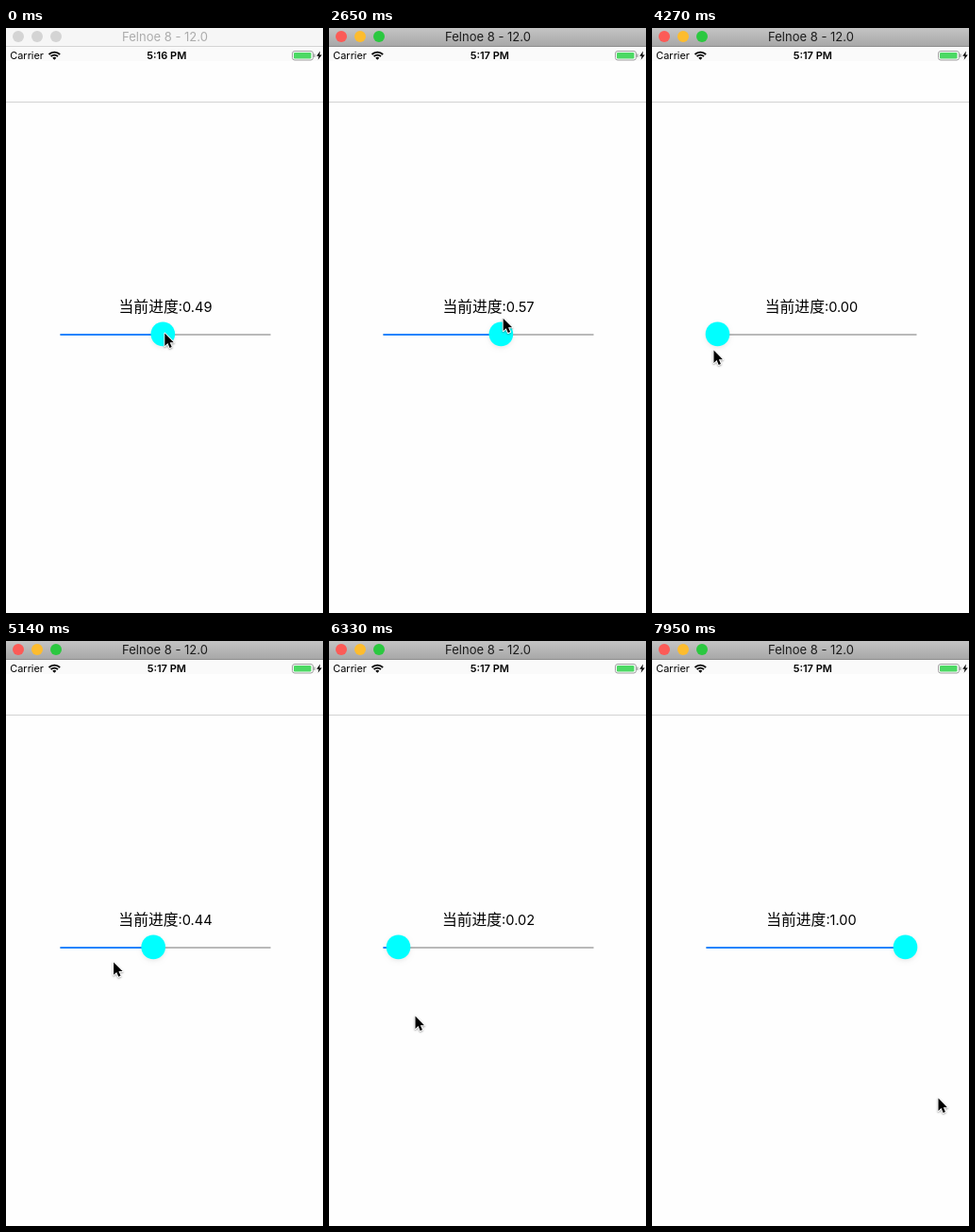
Recreate the animation shown at these times as an HTML page with a canvas. Size 336 px wide and 620 px high, loop 8000 ms.

```html
<!DOCTYPE html>
<html lang="zh">
<head>
<meta charset="utf-8">
<title>Slider</title>
<style>
html, body { margin: 0; width: 100%; height: 100%; overflow: hidden; background: #fefefe; }
canvas { display: block; width: 336px; height: 620px; }
</style>
</head>
<body>
<canvas id="stage"></canvas>
<script>
const W = 336, H = 620, LOOP = 8000;
const canvas = document.getElementById('stage');
const ratio = window.devicePixelRatio || 1;
canvas.width = W * ratio;
canvas.height = H * ratio;
const ctx = canvas.getContext('2d');

const SANS = 'Inter, "Liberation Sans", sans-serif';
const CJK = '"Noto Sans CJK SC", "Noto Sans CJK", "Noto Sans CJK JP", sans-serif';
const TRACK = { left: 57.5, right: 280.5, y: 325, min: 69.5, span: 199 };

// The screen refreshes in steps; the thumb runs slightly ahead of the pointer.
const FRAME = 147.1, FIRST = 300, LEAD = 80, GRIP = 71;

// Turning points of the pointer: time, x, y.
const TURNS = [
  [240, 167.8, 323], [580, 50, 322], [730, 50, 322], [1325, 102.4, 491], [1760, 65, 322],
  [1950, 65, 322], [2690, 185, 307], [3530, 40, 335], [3920, 62, 482], [4270, 65, 341],
  [4560, 65, 331], [4990, 66, 338], [5514, 270, 346], [6030, 75, 322], [6150, 75, 322],
  [6330, 91, 397], [6920, 66, 308], [7300, 66, 308], [7780, 302, 600], [7950, 303, 484]
];
const DRAGS = [[0, 580], [2050, 3530], [4850, 6030], [7370, LOOP]];

const clamp = v => Math.max(0, Math.min(1, v));
const smooth = p => p * p * (3 - 2 * p);

function pointerAt(t) {
  const next = Math.max(1, TURNS.findIndex(turn => turn[0] >= t));
  const i = t > TURNS.at(-1)[0] ? TURNS.length - 1 : next;
  const [t0, x0, y0] = TURNS[i - 1], [t1, x1, y1] = TURNS[i];
  const k = smooth(clamp((t - t0) / (t1 - t0)));
  return { x: x0 + (x1 - x0) * k, y: y0 + (y1 - y0) * k };
}

function valueAt(t) {
  const end = DRAGS.findLast(drag => drag[0] <= t)[1];
  return clamp((pointerAt(Math.min(t, end) + LEAD).x - GRIP) / TRACK.span);
}

function rect(x, y, w, h, fill) {
  ctx.fillStyle = fill;
  ctx.fillRect(x, y, w, h);
}

function roundRect(x, y, w, h, r) {
  ctx.beginPath();
  ctx.roundRect(x, y, w, h, r);
}

function disc(x, y, r, fill) {
  ctx.beginPath();
  ctx.arc(x, y, r, 0, Math.PI * 2);
  ctx.fillStyle = fill;
  ctx.fill();
}

function text(str, x, y, font, fill, align = 'left') {
  ctx.font = font;
  ctx.fillStyle = fill;
  ctx.textAlign = align;
  ctx.fillText(str, x, y);
}

function polygon(points) {
  ctx.beginPath();
  points.forEach(([x, y]) => ctx.lineTo(x, y));
  ctx.closePath();
}

function drawTitleBar(active) {
  let fill = '#f6f6f6';
  if (active) {
    fill = ctx.createLinearGradient(0, 0, 0, 20);
    fill.addColorStop(0, '#c4c4c4');
    fill.addColorStop(1, '#a6a6a6');
  }
  rect(0, 0, W, 20, fill);
  rect(0, 19, W, 1, active ? '#8e8e8e' : '#d4d4d4');
  const lights = active ? ['#fc5b57', '#fdbc2e', '#2bc840'] : Array(3).fill('#d4d4d4');
  lights.forEach((color, i) => disc(13 + i * 20, 9, 6, color));
  text('Felnoe 8 - 12.0', 168.5, 14, '13px ' + SANS, active ? '#1c1c1c' : '#acacac', 'center');
}

function drawWifi(x, y) {
  ctx.strokeStyle = '#000';
  ctx.lineWidth = 1.9;
  for (const r of [1.45, 5.2, 8.2]) {
    ctx.lineWidth = r < 2 ? 2.9 : 1.9;
    ctx.beginPath();
    ctx.arc(x, y, r, -Math.PI * 0.75, -Math.PI * 0.25);
    ctx.stroke();
  }
}

function drawBattery() {
  roundRect(303.5, 24.5, 22, 9.5, 2.5);
  ctx.strokeStyle = '#a0a0a0';
  ctx.lineWidth = 1;
  ctx.stroke();
  roundRect(305, 26, 18.5, 6.5, 1.3);
  ctx.fillStyle = '#4cd964';
  ctx.fill();
  rect(326.3, 27.5, 1.3, 3.5, '#a0a0a0');
  polygon([[333, 24.5], [329.2, 29.8], [331.6, 29.8], [330.6, 33.8], [334.8, 28.4], [332.3, 28.4]]);
  ctx.fillStyle = '#000';
  ctx.fill();
}

function drawStatus(clock) {
  rect(0, 20, W, 15, '#fafafa');
  text('Carrier', 4.3, 33, '10.9px ' + SANS, '#000');
  drawWifi(51.3, 33.8);
  text(clock, 170.3, 33, '600 11px ' + SANS, '#000', 'center');
  drawBattery();
  rect(0, 78, W, 1, '#d2d2d2');
}

function drawLabel(value) {
  const caption = '当前进度', number = ':' + value.toFixed(2);
  const big = '15.8px ' + CJK, small = '14.6px ' + SANS;
  ctx.font = big;
  const first = ctx.measureText(caption).width;
  ctx.font = small;
  const x = 169 - (first + ctx.measureText(number).width) / 2;
  text(caption, x, 301, big, '#000');
  text(number, x + first, 301, small, '#000');
}

function line(from, to, color) {
  ctx.beginPath();
  ctx.moveTo(from, TRACK.y);
  ctx.lineTo(to, TRACK.y);
  ctx.strokeStyle = color;
  ctx.lineWidth = 2;
  ctx.stroke();
}

function drawSlider(value) {
  const x = TRACK.min + TRACK.span * value;
  line(TRACK.left, TRACK.right, '#b9b9b9');
  line(TRACK.left, x, '#1a84fc');
  ctx.save();
  ctx.shadowColor = 'rgba(0, 0, 0, 0.08)';
  ctx.shadowBlur = 4 * ratio;
  ctx.shadowOffsetY = 2 * ratio;
  disc(x, 324.4, 12.8, '#00ffff');
  ctx.restore();
}

function drawPointer({ x, y }) {
  ctx.save();
  ctx.translate(x + 0.5, y + 0.6);
  ctx.scale(0.94, 0.94);
  polygon([[0, 0], [0, 14.2], [3.3, 11.1], [5.5, 16.3], [7.9, 15.3], [5.7, 10.2], [10.1, 10.2]]);
  ctx.shadowColor = 'rgba(0, 0, 0, 0.35)';
  ctx.shadowBlur = 2 * ratio;
  ctx.shadowOffsetY = ratio;
  ctx.strokeStyle = '#fff';
  ctx.lineWidth = 2;
  ctx.lineJoin = 'round';
  ctx.stroke();
  ctx.shadowColor = 'transparent';
  ctx.fillStyle = '#000';
  ctx.fill();
  ctx.restore();
}

function draw(t) {
  const step = Math.floor((t - FIRST + 14) / FRAME);
  const now = Math.max(0, FIRST + step * FRAME);
  ctx.setTransform(ratio, 0, 0, ratio, 0, 0);
  rect(0, 0, W, H, '#fefefe');
  drawTitleBar(t >= FIRST);
  drawStatus(t < 2340 ? '5:16 PM' : '5:17 PM');
  drawLabel(valueAt(now));
  drawSlider(valueAt(now));
  drawPointer(pointerAt(now));
}

const begin = performance.now();
function tick() {
  draw((performance.now() - begin) % LOOP);
  requestAnimationFrame(tick);
}
tick();
</script>
</body>
</html>
```
